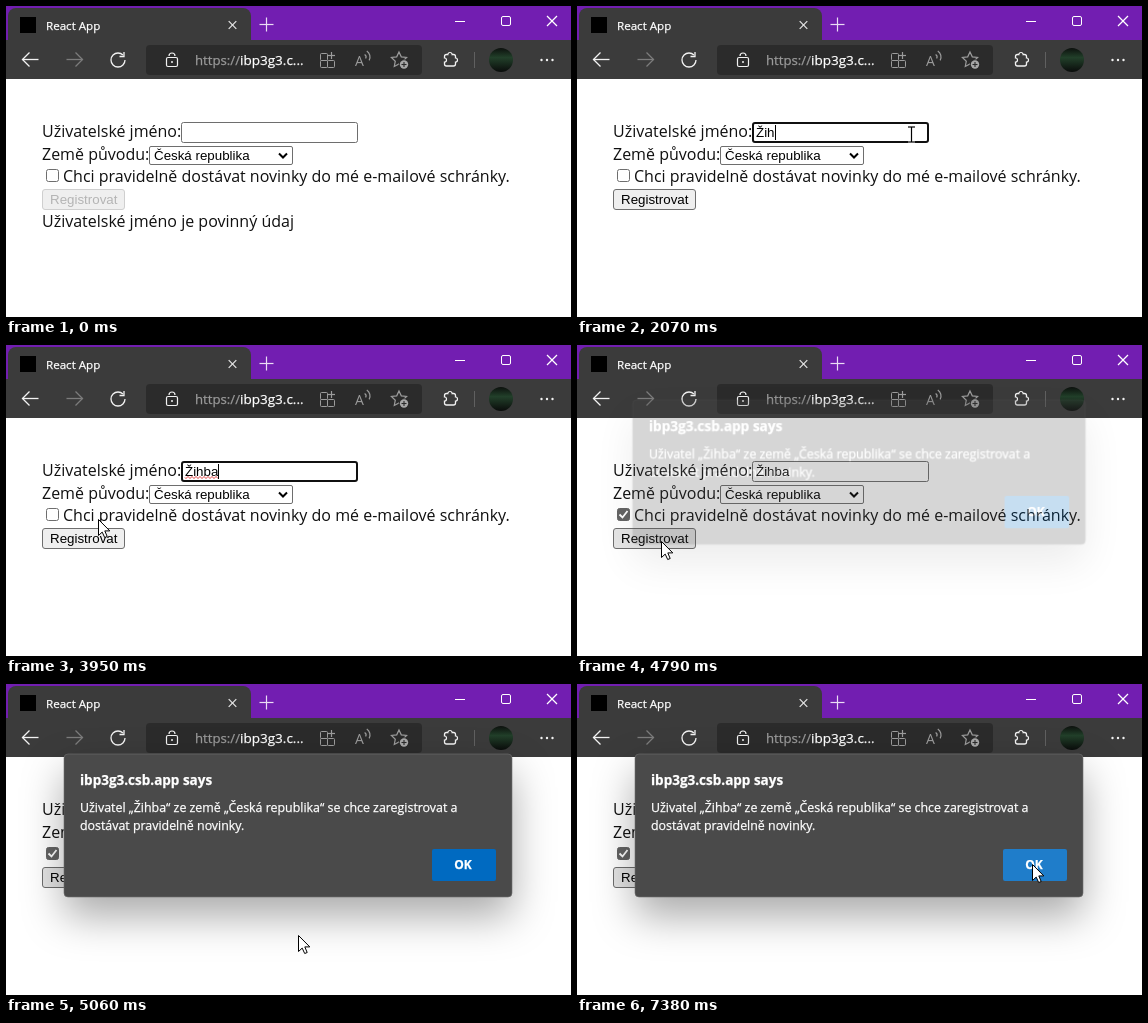
An HTML page with a canvas for the animation above (8 s loop, 565x311 px).

```html
<!DOCTYPE html>
<html lang="cs">
<head>
<meta charset="utf-8">
<title>React App</title>
<style>
html, body { margin: 0; width: 100%; height: 100%; overflow: hidden; background: #fff; }
canvas { display: block; width: 565px; height: 311px; }
</style>
</head>
<body>
<canvas id="stage" width="565" height="311"></canvas>
<script>
const W = 565, H = 311, LOOP = 8000;
const UI = '"Open Sans", sans-serif';
const FORM = '13.333px "Liberation Sans", Arial, sans-serif';
const LABEL = '16px ' + UI;
const BORDER = '#6e6e6e', CHROME = '#3b3b3b', PILL = '#2b2b2b', ICON = '#f2f2f2', MUTED = '#9c9c9c';

const NAME = 'Žihba';
const KEYS = [1650, 1900, 2070, 2630, 2780];
const LEAVE = 230, FOCUS = 930, SPELL = 3300, BLUR = 4180, CHECK = 4230;
const SUBMIT = 4440, DIALOG = 4740, HOVER_OK = 7200;

const MOVES = [
  { from: LEAVE, to: 750, x: 334, y: 128 },
  { from: 3100, to: 3880, x: 92, y: 174 },
  { from: 4280, to: 4530, x: 84, y: 196 },
  { from: 4840, to: 5060, x: 292, y: 251 },
  { from: 5060, to: 5570, x: 446, y: 216 },
  { from: 5870, to: 5930, x: 454, y: 209 },
  { from: 6770, to: 6830, x: 456, y: 201 },
  { from: 7110, to: 7380, x: 455, y: 180 }
];

const page = document.getElementById('stage').getContext('2d', { alpha: false });
const layer = document.createElement('canvas');
layer.width = W;
layer.height = H;
let g = page;

const ramp = (t, from, to) => Math.max(0, Math.min(1, (t - from) / (to - from)));
const smooth = p => p * p * (3 - 2 * p);
const lerp = (a, b, p) => a + (b - a) * p;
const mix = (a, b, p) => `rgb(${a.map((v, i) => Math.round(lerp(v, b[i], p)))})`;

function text(str, x, y, font, color, align = 'left') {
  g.font = font;
  g.fillStyle = color;
  g.textAlign = align;
  g.fillText(str, x, y);
}

// Light-on-dark interface text, slightly heavier than the regular cut
function uiText(str, x, y, font, color = '#fff', align = 'left') {
  text(str, x, y, font, color, align);
  g.strokeStyle = color;
  g.lineWidth = 0.25;
  g.strokeText(str, x, y);
}

function stroke(color, width) {
  g.strokeStyle = color;
  g.lineWidth = width;
  g.stroke();
}

function box(x, y, w, h, r, fill, edge, width = 1) {
  g.beginPath();
  g.roundRect(x, y, w, h, r);
  if (fill) { g.fillStyle = fill; g.fill(); }
  if (edge) stroke(edge, width);
}

function line(color, width, ...points) {
  g.beginPath();
  for (const [x, y] of points) g.lineTo(x, y);
  stroke(color, width);
}

function arc(x, y, r, from, to, color, width = 1.2) {
  g.beginPath();
  g.arc(x, y, r, from, to);
  stroke(color, width);
}

function disc(x, y, r, fill) {
  g.beginPath();
  g.arc(x, y, r, 0, 7);
  g.fillStyle = fill;
  g.fill();
}

function plus(x, y, r, color, width = 1.2) {
  line(color, width, [x - r, y], [x + r, y]);
  line(color, width, [x, y - r], [x, y + r]);
}

function cross(x, y, r, color) {
  line(color, 1.2, [x - r, y - r], [x + r, y + r]);
  line(color, 1.2, [x - r, y + r], [x + r, y - r]);
}

function navArrow(x, y, dir, color) {
  line(color, 1.3, [x - 8, y], [x + 8, y]);
  line(color, 1.3, [x + dir, y - 7], [x + 8 * dir, y], [x + dir, y + 7]);
}

function drawTitleBar(t) {
  const dim = ramp(t, LEAVE, 400) * (1 - ramp(t, FOCUS, 1000));
  g.fillStyle = mix([114, 30, 177], [133, 57, 190], dim);
  g.fillRect(0, 0, W, 36);

  box(2, 2, 243, 40, [8, 8, 0, 0], CHROME);
  g.fillStyle = '#000';
  g.fillRect(14, 11, 16, 16);
  uiText('React App', 40, 23.5, '11.6px ' + UI);
  cross(226.5, 19, 3.8, '#e6e6e6');
  plus(260.5, 18.5, 7, '#eadcf4');

  const c = mix([255, 255, 255], [185, 150, 214], dim);
  line(c, 1, [449, 15.5], [459, 15.5]);
  box(495.5, 10.5, 9, 9, 1.5, null, c);
  cross(546, 15, 5, c);
}

function drawAddressBar() {
  box(140, 39, 276, 30, 4, PILL);
  box(160.5, 51.5, 11, 9, 1.5, null, ICON, 1.2);
  arc(166, 50, 3, Math.PI, 0, ICON);
  disc(166, 56, 1, ICON);
  uiText('https://', 189, 59, '13.2px ' + UI, '#9a9a9a');
  uiText('ibp3g3.c...', 234, 59, '13.5px ' + UI);

  for (let i = 0; i < 3; i++) box(314.5 + (i > 1) * 7, 47.5 + (i > 0) * 7, 7, 7, 1, null, MUTED);
  plus(325.5, 49.5, 3.5, MUTED);

  text('A', 349, 60, '14px ' + UI, MUTED);
  for (const r of [3, 7]) arc(357, 51, r, -1, 0.5, MUTED);

  g.beginPath();
  for (let i = 0; i < 10; i++) {
    const a = (i / 5 - 0.5) * Math.PI, r = i % 2 ? 3.9 : 8;
    g.lineTo(393 + r * Math.cos(a), 54 + r * Math.sin(a));
  }
  g.closePath();
  stroke(MUTED, 1.2);
  disc(398, 58.5, 5.2, PILL);
  disc(398, 58.5, 4.2, '#a8a8a8');
  plus(398, 58.5, 2.5, PILL, 1.1);
}

function drawToolbar() {
  g.fillStyle = CHROME;
  g.fillRect(0, 34, W, 40);
  navArrow(24.5, 53.5, -1, ICON);
  navArrow(68.5, 53.5, 1, '#7c7c7c');
  arc(112, 54, 7, 0, 5.5, ICON, 1.3);
  line(ICON, 1.3, [118, 46], [118, 50.5], [113.5, 50.5]);
  drawAddressBar();

  // Puzzle piece: a tile with knobs on top and at the right, a notch on the left
  box(438.5, 48.5, 11, 11.5, 2, null, ICON, 1.3);
  for (const [x, y] of [[444, 48.5], [449.5, 54]]) disc(x, y, 1.8, CHROME);
  arc(444, 48.5, 2, Math.PI, 0, ICON);
  arc(449.5, 54, 2, -Math.PI / 2, Math.PI / 2, ICON);
  disc(438.5, 54, 1.8, CHROME);
  arc(438.5, 54, 2, -Math.PI / 2, Math.PI / 2, ICON);
  line('#606060', 1, [468.5, 46], [468.5, 62]);

  const glow = g.createLinearGradient(495, 42, 495, 66);
  glow.addColorStop(0, '#0c100d');
  glow.addColorStop(0.4, '#22402a');
  glow.addColorStop(1, '#0a0c0b');
  disc(495, 54, 12, glow);
  for (let i = -1; i <= 1; i++) disc(541 + i * 5.5, 54, 1.2, ICON);
}

function drawField(t) {
  const focused = t >= FOCUS && t < BLUR;
  if (focused) box(176, 117, 175, 19, 2, '#fff', '#101010', 2);
  else box(175.5, 116.5, 176, 20, 2, '#fff', BORDER);

  const typed = NAME.slice(0, KEYS.filter(k => t >= k).length);
  text(typed, 179, 131, FORM, '#000');
  if (!focused) return;

  const end = 179 + g.measureText(typed).width;
  if (t >= SPELL) {
    g.beginPath();
    for (let x = 179; x <= end; x++) g.lineTo(x, 132.5 + Math.sin((x - 179) * Math.PI / 2));
    stroke('#e03030', 1);
  }
  const lastKey = Math.max(960, ...KEYS.filter(k => t >= k));
  if ((t - lastKey) % 1060 < 530) {
    g.fillStyle = '#000';
    g.fillRect(Math.round(end), 119, 1, 15);
  }
}

function drawForm(t) {
  const ink = '#101010', ready = t >= KEYS[0];
  g.fillStyle = '#fff';
  g.fillRect(0, 73, W, H - 73);

  text('Uživatelské jméno:', 36, 131, LABEL, ink);
  drawField(t);

  text('Země původu:', 36, 154, LABEL, ink);
  box(143.5, 140.5, 143, 18, 1.5, '#fff', BORDER);
  text('Česká republika', 148, 154, FORM, '#000');
  line('#000', 2, [273, 147.5], [277, 151.5], [281, 147.5]);

  const checked = t >= CHECK;
  box(40.5, 163.5, 12, 12, 2, checked ? '#646464' : '#fff', checked ? '#646464' : BORDER);
  if (checked) line('#fff', 1.8, [42.5, 169.5], [45.5, 172.5], [50.5, 166]);
  text('Chci pravidelně dostávat novinky do mé e-mailové schránky.', 57, 176, LABEL, ink);

  box(36.5, 183.5, 82, 20, 2.5, t >= SUBMIT ? '#e5e5e5' : '#efefef', ready ? BORDER : '#cfcfcf');
  text('Registrovat', 44, 198, FORM, ready ? '#000' : '#b4b4b4');
  if (!ready) text('Uživatelské jméno je povinný údaj', 36, 221, LABEL, ink);
}

function paintDialog(t) {
  g.clearRect(0, 0, W, H);
  g.save();
  g.shadowColor = 'rgba(0,0,0,.34)';
  g.shadowBlur = 42;
  g.shadowOffsetY = 19;
  box(58, 70, 448, 143, 4, '#4a4a4a');
  g.restore();
  box(58, 70, 448, 143, 4, null, 'rgba(110,110,110,.6)');

  const body = '12.4px ' + UI;
  uiText('ibp3g3.csb.app says', 74, 100.5, 'bold 13.5px ' + UI);
  uiText(`Uživatel „${NAME}“ ze země „Česká republika“ se chce zaregistrovat a`, 74, 128, body);
  uiText('dostávat pravidelně novinky.', 74, 146, body);
  box(426, 165, 64, 32, 2, mix([0, 106, 193], [31, 125, 202], ramp(t, HOVER_OK, HOVER_OK + 120)));
  uiText('OK', 457, 185, 'bold 12px ' + UI, '#fff', 'center');
}

function drawDialog(t) {
  const open = ramp(t, DIALOG, DIALOG + 230);
  if (!open) return;
  g = layer.getContext('2d');
  paintDialog(t);
  g = page;

  const rest = 1 - smooth(open), scale = 1 + 0.012 * rest;
  g.save();
  g.globalAlpha = open;
  g.translate(282, 141.5 - 16.5 * rest);
  g.scale(scale, scale);
  g.drawImage(layer, -282, -141.5);
  g.restore();
}

function arrow(x, y) {
  g.beginPath();
  for (const [dx, dy] of [[0, 0], [0, 16], [3.7, 12.6], [6.2, 18], [8.7, 17], [6.3, 11.4], [11.3, 11.4]]) {
    g.lineTo(x + 0.5 + dx, y + 0.5 + dy);
  }
  g.closePath();
  g.fillStyle = '#fff';
  g.fill();
  stroke('#000', 1);
}

function beam(x, y) {
  for (const [color, width] of [['#fff', 3], ['#000', 1.2]]) {
    line(color, width, [x + 0.5, y - 7], [x + 0.5, y + 8]);
    for (const end of [y - 7, y + 8]) line(color, width, [x - 3, end], [x + 4, end]);
  }
}

function drawPointer(t) {
  if (t < LEAVE) return;
  let x = 500, y = 330;
  for (const m of MOVES) {
    const p = smooth(ramp(t, m.from, m.to));
    x = lerp(x, m.x, p);
    y = lerp(y, m.y, p);
  }
  const overField = x > 175 && x < 352 && y > 116 && y < 137;
  (overField ? beam : arrow)(Math.round(x), Math.round(y));
}

const start = performance.now();
function tick() {
  const t = (performance.now() - start) % LOOP;
  drawTitleBar(t);
  drawToolbar();
  drawForm(t);
  drawDialog(t);
  drawPointer(t);
  requestAnimationFrame(tick);
}
tick();
</script>
</body>
</html>
```
